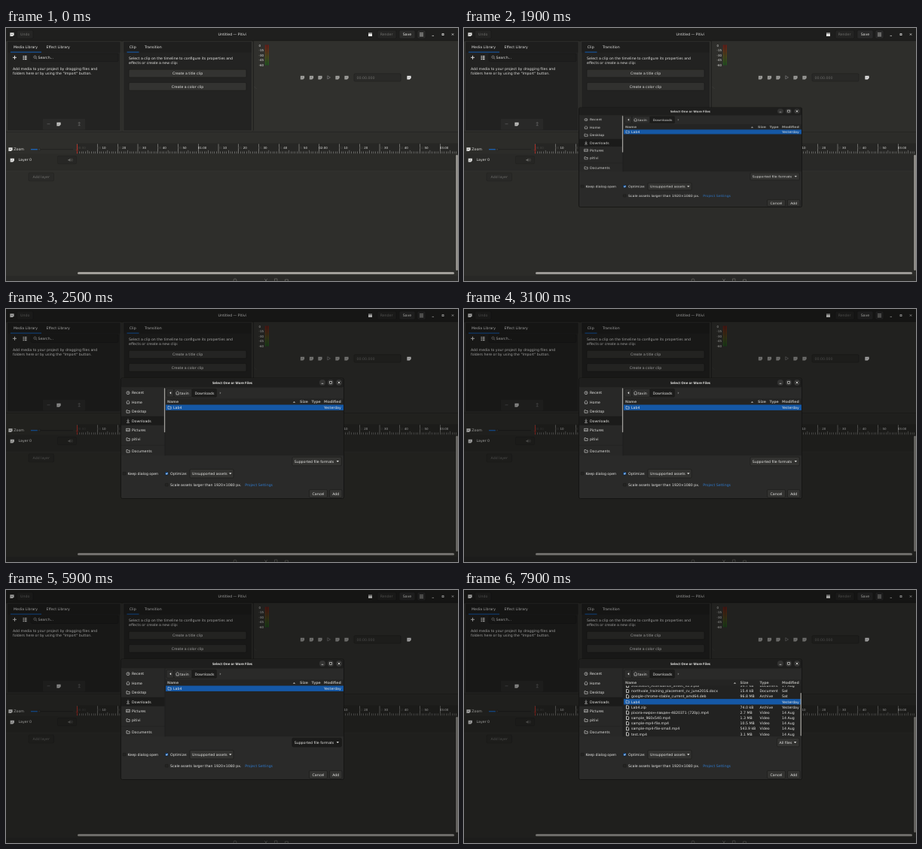
These frames come from a looping animation (600 px wide and 337 px high, 8 s). An HTML page:

```html
<!DOCTYPE html>
<html lang="en">
<head>
<meta charset="utf-8">
<title>Video editor import</title>
<style>
html, body { margin: 0; width: 100%; height: 100%; overflow: hidden; background: #2d2d2a; }
svg { display: block; width: 100vw; height: 100vh; }
text { font: 4.7px "DejaVu Sans", sans-serif; fill: #e6e6e4; text-rendering: geometricPrecision; white-space: pre; }
.title { font: bold 4.45px "Noto Sans", sans-serif; }
.head { font-weight: bold; fill: #a9a9a6; }
.small { font-size: 4px; }
.faint { fill: #6f6f6c; }
.prefix { fill: #4a4a47; }
.link { fill: #2f78c9; }
#dim, #dialog, #slider, .flip { animation: 8s linear infinite; }
#dim { animation-name: dim; }
#dialog { animation-name: grow; transform-origin: 300px 172px; }
#slider { animation-name: fade; }
.flip { animation-timing-function: step-end; }
#one { animation-name: before; }
#all { animation-name: after; }
#press { animation-name: press; }
#menu { animation-name: menu; }
#hover { animation-name: hover; }
@keyframes dim {
  0% { opacity: 0; }
  23.125% { opacity: 0; animation-timing-function: cubic-bezier(.25, .46, .45, .94); }
  34.375%, 100% { opacity: .32; }
}
@keyframes grow {
  0% { transform: scaleY(0); }
  23% { transform: scaleY(0); animation-timing-function: cubic-bezier(.25, .46, .45, .94); }
  24.35%, 100% { transform: scaleY(1); }
}
@keyframes fade { 0%, 56.25% { opacity: 1; } 58.75%, 100% { opacity: 0; } }
@keyframes before { 0% { visibility: visible; } 86.875%, 100% { visibility: hidden; } }
@keyframes after { 0% { visibility: hidden; } 86.875%, 100% { visibility: visible; } }
@keyframes press { 0% { visibility: hidden; } 73.75% { visibility: visible; } 86.875%, 100% { visibility: hidden; } }
@keyframes menu { 0% { visibility: hidden; } 76.875% { visibility: visible; } 86.25%, 100% { visibility: hidden; } }
@keyframes hover { 0% { visibility: hidden; } 79.375% { visibility: visible; } 86.25%, 100% { visibility: hidden; } }
</style>
</head>
<body>
<svg id="stage" viewBox="0 0 600 337" preserveAspectRatio="none">
  <defs>
    <linearGradient id="level" x2="0" y2="1">
      <stop offset="0" stop-color="#641c18"/>
      <stop offset=".3" stop-color="#5c3219"/>
      <stop offset=".6" stop-color="#46481c"/>
      <stop offset="1" stop-color="#20521f"/>
    </linearGradient>
    <clipPath id="view"><rect x="211.500" y="127.400" width="236.500" height="67.800"/></clipPath>
  </defs>
  <g id="app"></g>
  <rect id="dim" width="600" height="337"/>
  <g id="dialog"></g>
</svg>
<script>
const box = (x, y, w, h, fill, more = '') =>
  `<rect x="${x}" y="${y}" width="${w}" height="${h}" fill="${fill}" ${more}/>`;
// y is the middle of the line
const text = (x, y, s, cls = '', anchor = 'start') =>
  `<text x="${x}" y="${y + 1.7}" class="${cls}" text-anchor="${anchor}">${s}</text>`;
const mid = (x, y, s, cls) => text(x, y, s, cls, 'middle');
const line = (d, stroke = '#e0e0de', w = .7) =>
  `<path d="${d}" fill="none" stroke="${stroke}" stroke-width="${w}"/>`;
const shape = (d, fill = '#e0e0de') => `<path d="${d}" fill="${fill}"/>`;
const button = (x, y, w, h, fill = '#333331') =>
  box(x, y, w, h, fill, 'rx="1.500" stroke="#1a1a19" stroke-width=".6"');
const scrollbar = (x, y, w, h, more) => box(x, y, w, h, '#a19f9a', `rx="${Math.min(w, h) / 2}" ${more || ''}`);
const icon = (x, y, fill = '#e4e4e2') =>
  shape(`M${x - 2.6} ${y - 2.3}h5.200v3l-1.700 1.700h-3.500z`, fill) +
  line(`M${x - 1.3} ${y + .9}l1.200-1.300 1 .7`, '#555', .6);
const folder = (x, y) => line(`M${x - 2} ${y - 1.7}h1.500l.7.800h2v2.800h-4.200z`, '#e0e0de', .6);
const file = (x, y) => line(`M${x - 1.5} ${y - 2.2}h2l1.200 1.200v3.200h-3.200z`, '#e8e8e6', .8);
const house = (x, y) => line(`M${x - 2.4} ${y}l2.400-2.200 2.400 2.200m-4 0v2.200h3.200v-2.200`, '#e0e0de', .6);
const down = (x, y) => shape(`M${x - 1.7} ${y - .9}h3.400l-1.700 1.900z`);
const cross = (x, y, r) => line(`M${x - r} ${y - r}l${2 * r} ${2 * r}m0-${2 * r}l-${2 * r} ${2 * r}`, '#e0e0de', .8);
const panel = (x, w) =>
  box(x, 18, w, 119, '#232322', 'stroke="#383835" stroke-width=".8"') + box(x + .5, 18.5, w - 1, 14, '#1f1f1e');
const tabLine = (x, w) => box(x, 31.5, w, 1.3, '#185294');

function header() {
  return box(0, 0, 600, 17, '#1f1f1e') + box(0, 16.6, 600, .8, '#141413') +
    icon(8, 8.5) + button(14.5, 3, 21.5, 11, '#252524') + mid(25.2, 8.5, 'Undo', 'faint') +
    mid(300.3, 8.5, 'Untitled — Pitivi') +
    box(481, 6.5, 5, 4.5, '#eeeeec') + box(481, 7.4, 5, .5, '#444') +
    button(493, 3, 25, 11, '#252524') + mid(505, 8.5, 'Render', 'faint') +
    button(522, 3, 21, 11, '#2b2b2a') + mid(532.4, 8.5, 'Save') +
    button(546, 3, 11, 11, '#2b2b2a') + line('M549 6.800h5m-5 1.900h5m-5 1.900h5') +
    line('M565.500 10.400h2.500') + box(579, 7.6, 2, 2, 'none', 'stroke="#e0e0de" stroke-width=".8"') +
    cross(593, 8.5, 1.1);
}

function library() {
  return panel(1.5, 150.5) +
    text(10, 25.5, 'Media Library') + text(53.5, 25.5, 'Effect Library') + tabLine(6, 41) +
    line('M9 39.300h5m-2.500-2.500v5', '#eee', .9) +
    shape('M22.500 37h1.400v1.300h-1.400zm0 2h1.400v1.300h-1.400zm0 2h1.400v1.300h-1.400zm2.200-4h2.800v1.200h-2.800zm0 2h2.800v1.200h-2.800zm0 2h2.800v1.200h-2.800z') +
    box(33, 34, 116, 10.5, '#1f1f1e', 'rx="1.500" stroke="#191918" stroke-width=".6"') +
    '<circle cx="38.500" cy="38.700" r="1.600" fill="none" stroke="#bbb" stroke-width=".6"/>' +
    line('M39.700 40l1.400 1.400', '#bbb') + text(42.5, 39.3, 'Search...', 'search') +
    text(9, 54.5, 'Add media to your project by dragging files and') +
    text(9, 60.2, 'folders here or by using the "Import" button.') +
    box(49, 121, 56, 14.5, '#2a2a29', 'rx="1"') +
    line('M54.500 127.800h4', '#666') + icon(70, 128, '#c8c8c6') +
    line('M97.200 125.500v4.500m-1.500-3l1.500-1.500 1.500 1.500m-3 2.800h3', '#6c6c6a');
}

function clipPanel() {
  return panel(155.8, 170.7) +
    text(163.8, 25.5, 'Clip') + text(184, 25.5, 'Transition') + tabLine(160.5, 16) +
    text(163, 40, 'Select a clip on the timeline to configure its properties and') +
    text(163, 45.9, 'effects or create a new clip:') +
    button(163, 55.2, 156, 10.6) + mid(241, 60.5, 'Create a title clip') +
    button(163, 72.6, 156, 10.6) + mid(241, 77.8, 'Create a color clip');
}

function viewer() {
  let s = box(328.5, 17.4, 271.5, 121, '#30302d') + box(328, 17.4, .7, 119, '#1c1c1b');
  [0, 15, 30, 45, 60].forEach((v, i) =>
    s += text(v ? 342 : 338, 23 + i * 6.5, v ? '-' + v : '0', 'small', 'end'));
  s += box(343.7, 22.5, 5.3, 27, 'url(#level)') + box(346.2, 22.5, .4, 27, '#22221f');
  s += [393.5, 405.5, 417, 440, 452].map(x => icon(x, 66, '#a2a29f')).join('');
  return s + line('M426.800 63.600l3.700 2.200-3.700 2.200z', '#777', .8) +
    box(462, 60.7, 62, 10.4, '#2a2a28', 'rx="1.500" stroke="#20201f" stroke-width=".6"') +
    text(465.5, 66, '00:00.000', 'faint') + icon(535, 66, '#eee') +
    line('M329.500 78l3 3', '#454542', .5);
}

function timeline() {
  const x0 = 94.5, step = 26.75;
  let s = box(0, 138.5, 600, 198.5, '#2e2e2b') + box(0, 138, 600, .7, '#232321') +
    box(94, 153.5, 506, 14, '#272725') +
    icon(6, 161.5) + text(10.3, 161.5, 'Zoom') +
    box(33, 161.2, 56, 1, '#222221') + box(33, 161, 9, 1.4, '#1c63b5') +
    '<circle cx="44" cy="161.700" r="1.800" fill="#3a3a38" stroke="#1d1d1c" stroke-width=".5"/>';
  for (let i = 0; i < 189; i++) {
    const h = i % 10 ? (i % 5 ? 3 : 4.5) : 13;
    s += box((x0 + i * step / 10).toFixed(2), 167.4 - h, .5, h, i % 10 ? '#a5a5a2' : '#b8b8b5');
  }
  for (let i = 0; i <= 18; i++) {
    const m = '0' + Math.floor(i / 6), sec = i % 6 * 10 || '00', x = x0 + i * step + 11.3;
    s += i % 6
      ? text(x, 158.8, `<tspan class="prefix">${m}:</tspan>${sec}`, 'small', 'end')
      : text(x, 158.8, `${m}:${sec}`, i ? 'small' : 'small prefix', 'end');
  }
  s += box(94, 155, .9, 12.5, '#c02c22') + shape('M92.600 162h3.600l-1.800 3z', '#7a2a24');
  s += box(0, 167.6, 597, 22.6, '#2b2b28') + box(0, 190, 597, .6, '#343431') +
    icon(8.3, 176) + text(16.5, 175.7, 'Layer 0') +
    box(68.5, 170.5, 25, 10.5, '#272725', 'rx="1.500" stroke="#222220" stroke-width=".6"') +
    shape('M82.500 175h1.300l1.600-1.400v4.500l-1.600-1.400h-1.300z', '#6c6c69') +
    line('M86.300 174.400q1 1.300 0 2.700m1.300-3.400q1.500 2 0 4.100', '#6c6c69', .5) +
    box(30, 193, 33.500, 10.8, '#2a2a28', 'rx="1.500" stroke="#232321" stroke-width=".6"') +
    mid(46.7, 198.5, 'Add layer', 'faint') +
    box(0, 330, 600, 7, '#292927') +
    scrollbar(95, 325, 500, 3) + scrollbar(597.3, 169, 2.5, 154);
  return s + '<g fill="none" stroke="#62625f" stroke-width=".8"><circle cx="304" cy="336" r="2"/>' +
    '<path d="M343 334l4 4m0-4l-4 4m13.500-4h3.500v4h-3.500zm14 1h4v4h-4z"/></g>';
}

function sidebar() {
  const clock = (x, y) => `<circle cx="${x}" cy="${y}" r="2" fill="none" stroke="#e0e0de" stroke-width=".6"/>` +
    line(`M${x} ${y - 1.2}v1.300h1`, undefined, .5);
  const fetched = (x, y) => line(`M${x} ${y - 2.3}v3.600m-1.500-1.400l1.500 1.500 1.500-1.500m-3.400 2.800h3.800`, undefined, .6);
  const picture = (x, y) => box(x - 2.2, y - 1.8, 4.4, 3.6, 'none', 'stroke="#e0e0de" stroke-width=".6"') +
    line(`M${x - 2} ${y + 1.4}l1.400-1.600 1.200 1 1.300-1.200`, undefined, .5);
  const rows = [['Recent', 111.7, clock], ['Home', 124, house], ['Desktop', 136.4, folder],
    ['Downloads', 148.8, fetched], ['Pictures', 161, picture], ['pitivi', 173.4, folder],
    ['Documents', 189.2, folder]];
  return box(153, 104.5, 58, 90.7, '#282827') + box(153, 142.8, 57.5, 12, '#1b1b1a') +
    box(153, 181.3, 57.5, .5, '#1e1e1d') +
    rows.map(([name, y, draw]) => draw(162, y) + text(167, y, name)).join('') +
    box(210.7, 104.5, .6, 90.7, '#191918') +
    scrollbar(209.9, 105.3, 1.3, 59, 'id="slider"');
}

const heads = (arrow, size, type) =>
  shape(`M${arrow - 1.7} 124.800h3.400l-1.700-1.900z`, '#b5b5b3') + text(size, 123.7, 'Size', 'head') + text(type, 123.7, 'Type', 'head');
const picked = y => box(212, y - 3.7, 236, 7.4, '#1558a6');

function listing() {
  const rows = [
    ['20230814_Attendance_Sheet_v2.3.pdf', '34.7 kB', 'Document', '17 Aug'],
    ['northvale_training_placement_cv_june2016.docx', '15.4 kB', 'Document', 'Sat'],
    ['google-chrome-stable_current_amd64.deb', '96.8 MB', 'Archive', 'Sat'],
    ['Lab4', '', '', 'Yesterday'],
    ['Lab4.zip', '74.0 kB', 'Archive', 'Yesterday'],
    ['pixora-мирон-лавден-4820371 (720p).mp4', '2.7 MB', 'Video', '14 Aug'],
    ['sample_960x540.mp4', '1.3 MB', 'Video', '14 Aug'],
    ['sample-mp4-file.mp4', '10.5 MB', 'Video', '14 Aug'],
    ['sample-mp4-file-small.mp4', '543.9 kB', 'Video', '14 Aug'],
    ['test.mp4', '3.1 MB', 'Video', '14 Aug']];
  let s = '';
  rows.forEach(([name, size, type, date], i) => {
    const y = 127.3 + i * 7.17;
    s += (size ? file(217, y) : picked(y) + folder(217, y)) + text(222, y, name) +
      text(366.5, y, size) + text(392.5, y, type) + text(422, y, date);
  });
  return heads(359.5, 366.5, 392.5) + `<g clip-path="url(#view)">${s}</g>` +
    scrollbar(446.6, 137, 1.3, 57.5) +
    button(415.5, 197.3, 29.5, 11.5) + text(418.5, 203, 'All files') + down(439.6, 203);
}

function dialog() {
  const caps = [420, 431, 442].map(x => `<circle cx="${x}" cy="98" r="4" fill="#343433"/>`).join('');
  const check = (x, y, fill) => box(x - 1.9, y - 1.9, 3.8, 3.8, fill, 'rx=".6" stroke="#1a1a19" stroke-width=".5"');
  const combo = fill => button(380, 197.3, 65.3, 11.5, fill) + text(382.7, 203, 'Supported file formats') + down(440.3, 203);
  return box(152.5, 92, 296, 160.5, '#2a2a29', 'rx="2" stroke="#121211" stroke-width=".8"') +
    box(153, 92.4, 295, 12, '#1e1e1d', 'rx="2"') +
    mid(300.5, 98, 'Select One or More Files', 'title') + caps +
    line('M418.700 99.300h2.600') + box(429.7, 96.7, 2.6, 2.6, 'none', 'stroke="#e0e0de" stroke-width=".6"') + cross(442, 98, 1.3) +
    button(213, 106.3, 10, 11, '#2e2e2d') + shape('M219.200 110v3.600l-2-1.800z') +
    button(223, 106.3, 24, 11, '#2e2e2d') + house(227.7, 111.8) + text(231, 111.8, 'tavin') +
    button(247, 106.3, 32.5, 11, '#1c1c1b') + mid(263.5, 111.8, 'Downloads') +
    shape('M283.800 110.200v3.200l1.700-1.600z', '#777') +
    box(211.3, 119.3, 236.7, 8, '#242423') + box(211.3, 127.2, 236.7, 68, '#222221') +
    text(214, 123.7, 'Name', 'head') + text(422, 123.7, 'Modified', 'head') +
    `<g id="one" class="flip">${heads(382.5, 390, 405.5) + picked(131.2) + folder(217, 131.2) + text(222, 131.2, 'Lab4') + text(422, 131.2, 'Yesterday') + combo()}</g>` +
    `<g id="press" class="flip">${combo('#1b1b1a')}</g>` +
    `<g id="all" class="flip">${listing()}</g>` + sidebar() +
    check(157, 219.2, '#242423') + text(161.5, 219.2, 'Keep dialog open') +
    check(213.3, 219.2, '#1b66bd') + line('M212.200 219.200l.9 1 1.500-2', '#fff', .7) + text(218, 219.2, 'Optimize:') +
    button(244, 213.4, 58, 11.6) + text(247, 219.2, 'Unsupported assets') + down(297.8, 219.2) +
    check(213.3, 234.2, '#242423') + text(218, 234.2, 'Scale assets larger than 1920×1080 px.') +
    text(317.3, 234.2, 'Project Settings', 'link') +
    button(402.5, 240.6, 24, 10.6) + mid(414.5, 246, 'Cancel') +
    button(429.5, 240.6, 16.5, 10.6) + mid(437.8, 246, 'Add') +
    `<g id="menu" class="flip">${box(379.5, 209.6, 62, 17.6, '#262625', 'stroke="#141413" stroke-width=".6"')}` +
    `<g id="hover" class="flip">${box(380, 218.3, 61, 8.2, '#1558a6')}</g>` +
    text(382.7, 214.2, 'Supported file formats') + text(382.7, 222.4, 'All files') + '</g>';
}

document.getElementById('app').innerHTML = header() + library() + clipPanel() + viewer() + timeline();
document.getElementById('dialog').innerHTML = dialog();
</script>
</body>
</html>
```
